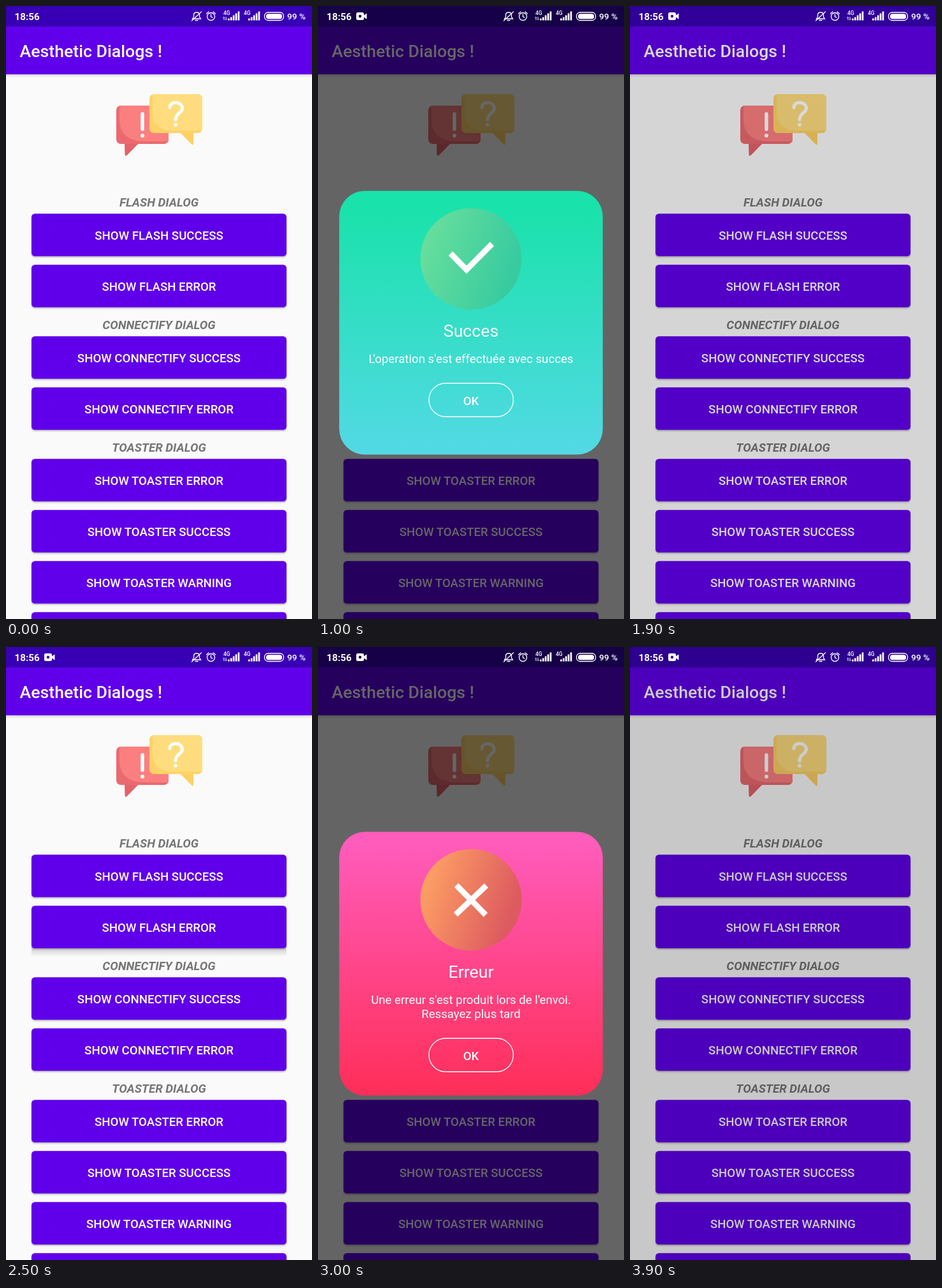
Recreate the animation shown at these times as an HTML page. Size 480 by 960 pixels, loop 4000 ms.

```html
<!DOCTYPE html>
<html lang="en">
<head>
<meta charset="utf-8">
<title>Aesthetic Dialogs</title>
<style>
  html, body { margin: 0; width: 100%; height: 100%; overflow: hidden; background: #fafafa; }
  svg { display: block; width: 480px; height: 960px; }
  text { font-family: Roboto, sans-serif; font-size: 18.67px; fill: #fff; }
  .mid { text-anchor: middle; }
  .medium { font-weight: 500; }
  .label { font-weight: 700; font-style: italic; fill: #757575; }
  .line { fill: none; stroke: #fff; }
</style>
</head>
<body>
<svg id="stage" viewBox="0 0 480 960">
  <defs>
    <linearGradient id="okBg" x2="0" y2="1">
      <stop offset=".05" stop-color="#19e2aa"/><stop offset="1" stop-color="#53d9e5"/>
    </linearGradient>
    <linearGradient id="okDisc" x2="1" y2=".35">
      <stop offset=".1" stop-color="#68df9c"/><stop offset="1" stop-color="#38cba0"/>
    </linearGradient>
    <linearGradient id="errBg" x2="0" y2="1">
      <stop offset=".04" stop-color="#ff5cbb"/><stop offset="1" stop-color="#ff2e58"/>
    </linearGradient>
    <linearGradient id="errDisc" x2="1" y2=".35">
      <stop offset=".1" stop-color="#ffa264"/><stop offset="1" stop-color="#dd5a60"/>
    </linearGradient>
    <linearGradient id="fade" x2="0" y2="1">
      <stop stop-color="#000" stop-opacity=".24"/><stop offset="1" stop-color="#000" stop-opacity="0"/>
    </linearGradient>
    <filter id="soft" x="-5%" y="-10%" width="110%" height="130%">
      <feDropShadow dx="0" dy="1.6" stdDeviation="1.2" flood-opacity=".3"/>
    </filter>
  </defs>

  <rect width="480" height="960" fill="#fafafa"/>
  <rect y="107" width="480" height="5" fill="url(#fade)" opacity=".6"/>
  <rect y="32" width="480" height="75" fill="#6000ea"/>
  <rect width="480" height="32" fill="#3800b4"/>
  <text x="21.5" y="80" class="medium" style="font-size:26.67px">Aesthetic Dialogs !</text>

  <g id="bubbles">
    <path d="M186 214 L186.500 233 Q187 236 190 233.500 L209 214Z" fill="#e4626b"/>
    <rect x="173" y="156" width="82" height="60" rx="7" fill="#ea6a70"/>
    <path d="M178 156H248a7 7 0 0 1 7 7V212H214Q178 210 178 177Z" fill="#fc7f80"/>
    <path d="M214 169V193" class="line" stroke-width="5.500" stroke-linecap="round"/>
    <circle cx="214" cy="203" r="3" fill="#fff"/>
    <path d="M272 197L291 216.500Q294 219 294 215V197Z" fill="#ffd064"/>
    <rect x="225" y="138" width="83" height="61" rx="7" fill="#ffd26a"/>
    <path d="M230 138H301a7 7 0 0 1 7 7V195H258Q230 193 230 166Z" fill="#ffdd7e"/>
    <path d="M257 159C257 148 276 149 276.500 160C276.500 168 266 167 266 178" class="line" stroke-width="5" stroke-linecap="round"/>
    <circle cx="266" cy="186" r="2.800" fill="#fff"/>
  </g>

  <g id="list"></g>
  <rect id="dim" width="480" height="960" opacity="0"/>
  <g id="dialogs"></g>

  <g id="status">
    <text x="13.500" y="22" style="font-size:15.2px;font-weight:700">18:56</text>
    <g id="cam">
      <path d="M62.500 10H69.500Q72 10 72 12.500V14.500L76.500 11.500V20.500L72 17.500V19.500Q72 22 69.500 22H62.500Q60 22 60 19.500V12.500Q60 10 62.500 10ZM68.200 16a2.200 2.200 0 1 0 -4.400 0a2.200 2.200 0 1 0 4.400 0Z" fill="#fff" fill-rule="evenodd"/>
    </g>
    <g class="line" stroke-width="1.300" stroke-linecap="round">
      <path d="M292.500 20H305.500L303.500 17V14Q303.500 10 299 10T294.500 14V17ZM297 22.500H301M291.500 23L306.500 9"/>
      <circle cx="321.500" cy="16.500" r="6"/>
      <path d="M321.500 13V16.800L324 18M314.500 12L318 9M328.500 12L325 9"/>
      <rect x="405.500" y="10" width="30" height="12.500" rx="5.500"/>
    </g>
    <rect x="408" y="12.200" width="25" height="8" rx="3.500" fill="#fff"/>
    <text x="441" y="21" class="medium" style="font-size:13.7px">99 %</text>
  </g>
</svg>

<script>
const LOOP = 4000, STEP = 100;
const $ = id => document.getElementById(id);
const clamp = v => Math.max(0, Math.min(1, v));
const ramp = (t, from, length) => clamp((t - from) / length);
const ease = f => (1 - Math.cos(Math.PI * f)) / 2;

const rows = [
  [307, "FLASH DIALOG"],
  [325, "SHOW FLASH SUCCESS"],
  [405, "SHOW FLASH ERROR"],
  [499, "CONNECTIFY DIALOG"],
  [517, "SHOW CONNECTIFY SUCCESS"],
  [597, "SHOW CONNECTIFY ERROR"],
  [691, "TOASTER DIALOG"],
  [709, "SHOW TOASTER ERROR"],
  [789, "SHOW TOASTER SUCCESS"],
  [869, "SHOW TOASTER WARNING"],
  [949, ""]
];

const label = (y, text, cls, style = "") =>
  `<text x="240" y="${y}" class="mid ${cls}" style="${style}">${text}</text>`;

const button = (y, text) =>
  `<rect class="lift" x="40" y="${y + 61}" width="400" height="19" fill="url(#fade)" opacity="0"/>
   <rect x="40" y="${y + .3}" width="400" height="66.5" rx="5.3" fill="#6000ea" filter="url(#soft)"/>
   ${label(y + 41, text, "medium")}`;

$("list").innerHTML = rows.map(([y, text]) =>
  text.endsWith("DIALOG") ? label(y + 6.5, text, "label") : button(y, text)).join("");

function dialog(kind, mark, title, lines) {
  const y = 590.7 + 22 * (lines.length - 1);
  return `<g>
    <rect x="33.300" y="289.500" width="413.400" height="413" rx="40" fill="url(#${kind}Bg)"/>
    <circle cx="240" cy="396" r="79.500" fill="url(#${kind}Disc)"/>
    <path d="${mark}" class="line" stroke-width="9"/>
    ${label(518, title, "", "font-size:26.67px")}
    ${lines.map((s, i) => label(558.5 + 22 * i, s, "")).join("")}
    <rect x="174" y="${y}" width="132.400" height="52.500" rx="26.200" class="line" stroke-width="1.350"/>
    ${label(y + 34, "OK", "medium")}
  </g>`;
}

$("dialogs").innerHTML =
  dialog("ok", "M208 387.500L233 413L273 372.500", "Succes",
    ["L'operation s'est effectuée avec succes"]) +
  dialog("err", "M217 373L263 419.500M264 373.500L216 419", "Erreur",
    ["Une erreur s'est produit lors de l'envoi.", "Ressayez plus tard"]);

function signal(x) {
  const bars = [3, 5, 8, 11, 14].map((h, i) =>
    `<rect x="${x + 7 + i * 3.9}" y="${22.5 - h}" width="2.700" height="${h}" fill="#fff"/>`).join("");
  return `<text x="${x}" y="14" class="medium" style="font-size:8.5px">4G</text>${bars}`;
}
$("status").insertAdjacentHTML("beforeend", signal(341) + signal(373) +
  `<path d="M342 17V22M340.800 18.500L342 17M345 17V22M345 22L346.200 20.500" class="line" stroke-width="1"/>`);

// press, dialog entry and exit times
const acts = [
  { press: 200, enter: 600, exit: 1600 },
  { press: 2200, enter: 2600, exit: 3633 }
];
const panels = [...$("dialogs").children];
const lifts = document.querySelectorAll(".lift");

function draw(t) {
  let dim = 0;
  acts.forEach(({ press, enter, exit }, i) => {
    const slide = ease(ramp(t, enter - 35, 400));
    const leave = ramp(t, exit, 250);
    const y = -960 * (1 - slide) - 365 * ease(leave);
    panels[i].setAttribute("transform", `translate(0 ${y.toFixed(2)})`);
    panels[i].setAttribute("opacity", slide > 0 ? 1 - leave : 0);
    dim += .6 * (ramp(t, enter, 400) - ramp(t, exit, 400));
    lifts[i].setAttribute("opacity", ramp(t, press - 100, 200) - ramp(t, enter - 100, 200));
  });
  $("dim").setAttribute("opacity", dim);
  $("cam").setAttribute("opacity", t < 200 ? 0 : 1);
}

const start = performance.now();
function tick() {
  const t = (performance.now() - start) % LOOP;
  draw(Math.floor(t / STEP) * STEP);
  requestAnimationFrame(tick);
}
tick();
</script>
</body>
</html>
```
